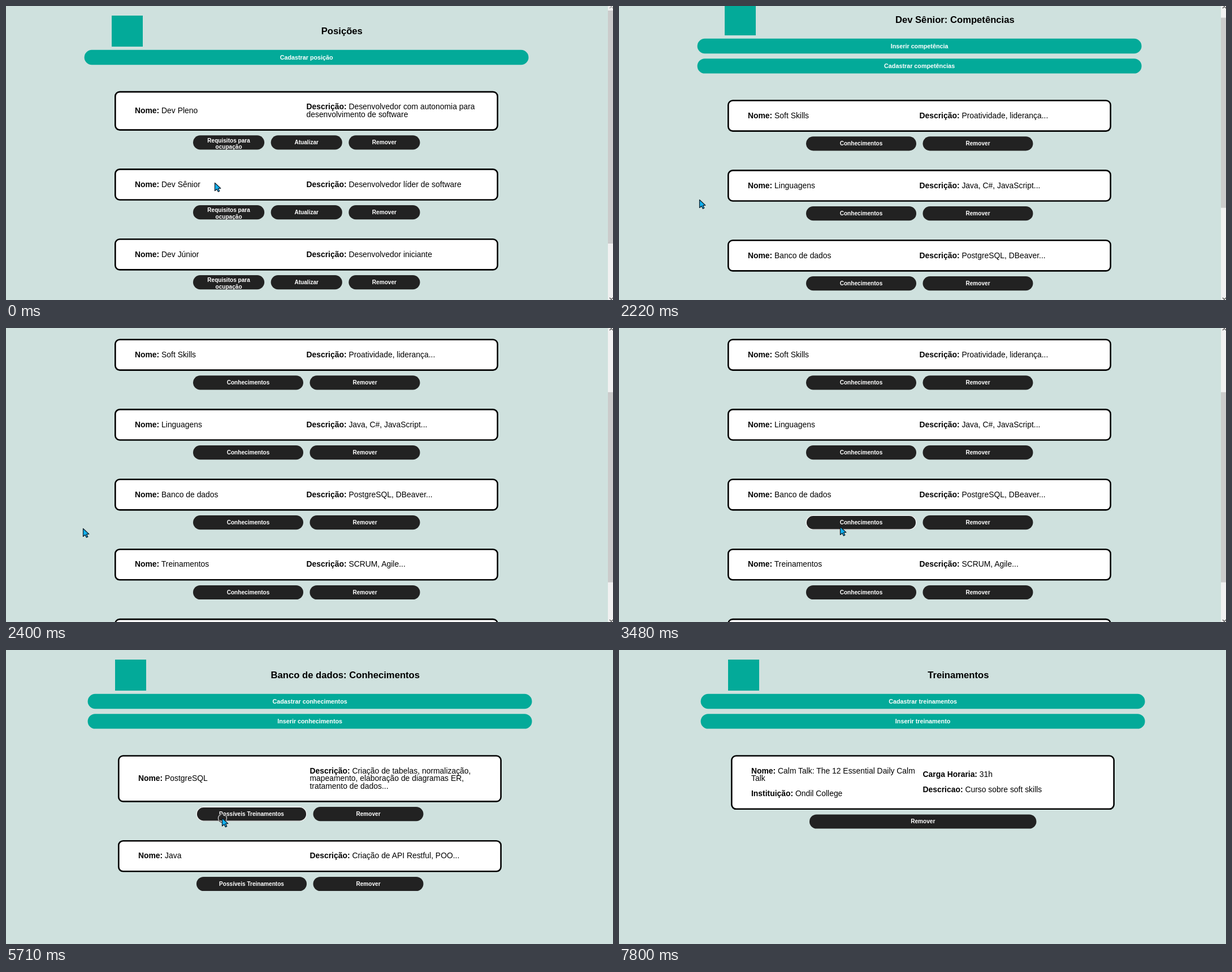
Write an HTML page that moves like this. It is 1074x521 px and loops after 7900 ms.

```html
<!DOCTYPE html>
<html lang="pt-BR">
<head>
<meta charset="utf-8">
<title>Posições e competências</title>
<style>
  html, body { margin: 0; width: 100%; height: 100%; overflow: hidden; background: #cfe1de; }
  svg { display: block; width: 1074px; height: 521px; font-family: "Liberation Sans", Arial, sans-serif; }
  .title { font-size: 16.65px; font-weight: bold; text-anchor: middle; }
  .card { fill: #fff; stroke: #000; stroke-width: 2.6; }
  .label { font-size: 13.9px; }
  .label .key { font-weight: bold; }
  .bar { fill: #03aa99; }
  .bar-text { font-size: 10.77px; }
  .button { fill: #222; }
  .button-text { font-size: 10.08px; }
  .bar-text, .button-text { fill: #fff; font-weight: bold; text-anchor: middle; }
  #focus { fill: none; stroke: #fff; stroke-width: 1.2; }
  #ring { fill: none; stroke: #fff; stroke-width: 1.2; mix-blend-mode: difference; }
</style>
</head>
<body>
<svg viewBox="0 0 1074 521">
  <rect width="1074" height="521" fill="#cfe1de"/>
  <g id="pages"></g>
  <g id="scrollbar">
    <rect x="1065" width="9" height="521" fill="#f1f1f1"/>
    <rect id="thumb" x="1065" width="9" fill="#cbcbcb"/>
    <path id="up" d="M1068 4l3-3 3 3" fill="none" stroke-width="1.4"/>
    <path d="M1068 517l3 3 3-3" fill="none" stroke="#505050" stroke-width="1.4"/>
  </g>
  <rect id="focus" height="24.6" rx="12.3"/>
  <circle id="ring" r="7.5"/>
  <path id="cursor" d="M0 0V14L3.5 11 5.9 15.6 8.3 14.4 6.1 9.9 10.4 9.6Z"
        fill="#12b0ee" stroke="#0b1a26" stroke-width="1.2" stroke-linejoin="round"/>
</svg>
<script>
const LOOP = 7900, LINE = 13.4;
const $ = id => document.getElementById(id);

// Lines written as "Key: value" get a bold key; an empty line leaves a gap.
const java = [['Nome: Java'], ['Descrição: Criação de API Restful, POO...']];
const postgres = [['Nome: PostgreSQL'], [
  'Descrição: Criação de tabelas, normalização,',
  'mapeamento, elaboração de diagramas ER,',
  'tratamento de dados...'
]];
const row = (name, about) => [['Nome: ' + name], ['Descrição: ' + about]];
const knowledge = cards => ({
  title: 'Banco de dados: Conhecimentos', dx: 6,
  bars: ['Cadastrar conhecimentos', 'Inserir conhecimentos'],
  buttons: ['Possíveis Treinamentos', 'Remover'], cards
});

const pages = [
  { at: 0, title: 'Posições', dx: 0, thumb: 413, bars: ['Cadastrar posição'],
    buttons: ['Requisitos para|ocupação', 'Atualizar', 'Remover'],
    cards: [
      [['Nome: Dev Pleno'],
       ['Descrição: Desenvolvedor com autonomia para', 'desenvolvimento de software']],
      row('Dev Sênior', 'Desenvolvedor líder de software'),
      row('Dev Júnior', 'Desenvolvedor iniciante')
    ] },
  { at: 580, title: 'Dev Sênior: Competências', dx: 0, thumb: 337,
    bars: ['Inserir competência', 'Cadastrar competências'],
    buttons: ['Conhecimentos', 'Remover'],
    cards: [
      row('Soft Skills', 'Proatividade, liderança...'),
      row('Linguagens', 'Java, C#, JavaScript...'),
      row('Banco de dados', 'PostgreSQL, DBeaver...'),
      row('Treinamentos', 'SCRUM, Agile...'),
      row('Idiomas', 'Inglês, espanhol...')
    ] },
  { at: 3820, ...knowledge([java, postgres]) },
  { at: 4060, ...knowledge([postgres, java]) },
  { at: 5820, title: 'Treinamentos', dx: 6,
    bars: ['Cadastrar treinamentos', 'Inserir treinamento'],
    buttons: ['Remover'],
    cards: [[
      ['Nome: Calm Talk: The 12 Essential Daily Calm', 'Talk', '', 'Instituição: Ondil College'],
      ['Carga Horaria: 31h', '', 'Descricao: Curso sobre soft skills']
    ]] }
];

const text = (cls, x, y, body) => `<text class="${cls}" x="${x}" y="${y}">${body}</text>`;
const box = (cls, x, y, w, h, r) =>
  `<rect class="${cls}" x="${x}" y="${y}" width="${w}" height="${h}" rx="${r}"/>`;

function column(lines, x, middle) {
  return lines.map((line, i) => {
    const y = middle + (i - (lines.length - 1) / 2) * LINE + 4.2;
    return text('label', x, y, line.replace(/^[^ ]+( Horaria)?:/, '<tspan class="key">$&</tspan>'));
  }).join('');
}

function buttonRow(labels, y) {
  const gap = 11.5, w = (401.5 - gap * (labels.length - 1)) / labels.length;
  return labels.map((label, i) => {
    const x = 331 + i * (w + gap), parts = label.split('|');
    const first = y + (parts.length > 1 ? 12.3 : 15.8);
    return box('button', x, y, w, 25.2, 12.6) +
      parts.map((p, k) => text('button-text', x + w / 2, first + k * 11.6, p)).join('');
  }).join('');
}

function build(page) {
  let out = '<rect x="187" y="17" width="55" height="55" fill="#03aa99"/>' +
    text('title', 594.3, 50, page.title);
  page.bars.forEach((label, i) => {
    const y = 77.8 + i * 35.4;
    out += box('bar', 138.6, y, 786, 26.4, 13.2) + text('bar-text', 531.6, y + 16.8, label);
  });
  let y = 115.4 + page.bars.length * 35.4;
  for (const [left, right] of page.cards) {
    const h = 43.3 + LINE * Math.max(left.length, right.length);
    out += box('card', 193.3, y + 1.3, 676.4, h - 2.6, 8) +
      column(left, 228, y + h / 2) + column(right, 531.5, y + h / 2) +
      buttonRow(page.buttons, y + h + 8.3);
    y += h + 67.2;
  }
  return `<g>${out}</g>`;
}
$('pages').innerHTML = pages.map(build).join('');
const groups = [...$('pages').children];

// Pointer moves: first change, last change, number of changes, end x, end y, downward bow.
const moves = [
  [40, 230, 4, 400, 374], [1810, 2220, 7, 142, 343],
  [2280, 2400, 3, 136, 355], [2460, 2520, 2, 130, 363],
  [2700, 3180, 9, 395, 362, 16], [3360, 3420, 2, 391, 352],
  [3820, 3940, 3, 375, 358], [4000, 4240, 5, 231, 345],
  [5020, 5420, 8, 382, 297.5], [5880, 6060, 4, 175, 336],
  [6460, 7240, 13, 1052, 519.5], [7740, 7740, 1, 1060, 519.5], [7800, 7800, 1, 1060, 545]
];
const scrolls = [[2220, 20], [2280, 78], [2340, 138], [2400, 167]];
// Clicks: press, ring end, focus end, then the focused button's x, y and width.
const clicks = [
  [520, 580, 580, 331, 353.1, 126.2],
  [3420, 3480, 3820, 331, 332.1, 195],
  [5710, 5820, 5820, 337, 278.1, 195]
];

const ease = p => p * p * (3 - 2 * p);
const show = (el, on) => { el.style.display = on ? '' : 'none'; };

function pointer(t) {
  let x = 369, y = 313;
  for (const [from, to, n, ex, ey, bow = 0] of moves) {
    if (t < from) break;
    const step = (to - from) / (n - 1) || 1;
    const p = ease(Math.min(n, Math.floor((t - from) / step + 1e-6) + 1) / n);
    x += (ex - x) * p;
    y += (ey - y) * p + bow * 4 * p * (1 - p);
  }
  return [x, y];
}

function draw(t) {
  const now = pages.findLastIndex(p => t >= p.at), page = pages[now];
  const scroll = now === 1 ? scrolls.reduce((s, [at, v]) => t >= at ? v : s, 0) : 0;
  groups.forEach((g, i) => show(g, i === now));
  groups[now].setAttribute('transform', `translate(${page.dx} ${-scroll})`);

  show($('scrollbar'), page.thumb);
  if (page.thumb) {
    $('thumb').setAttribute('y', 8 + scroll * 0.633);
    $('thumb').setAttribute('height', page.thumb);
    $('up').setAttribute('stroke', scroll ? '#505050' : '#a3a3a3');
  }

  const [x, y] = pointer(t);
  $('cursor').setAttribute('transform', `translate(${x + 0.5} ${y + 0.5})`);
  const click = clicks.find(c => t >= c[0] && t < c[2]);
  show($('focus'), click);
  show($('ring'), click && t < click[1]);
  if (click) {
    $('focus').setAttribute('x', click[3] + 0.3);
    $('focus').setAttribute('y', click[4] + 0.3);
    $('focus').setAttribute('width', click[5] - 0.6);
    $('ring').setAttribute('cx', x + 1);
    $('ring').setAttribute('cy', y + 0.5);
  }
}

const start = performance.now();
function tick() {
  draw((performance.now() - start) % LOOP);
  requestAnimationFrame(tick);
}
tick();
</script>
</body>
</html>
```
